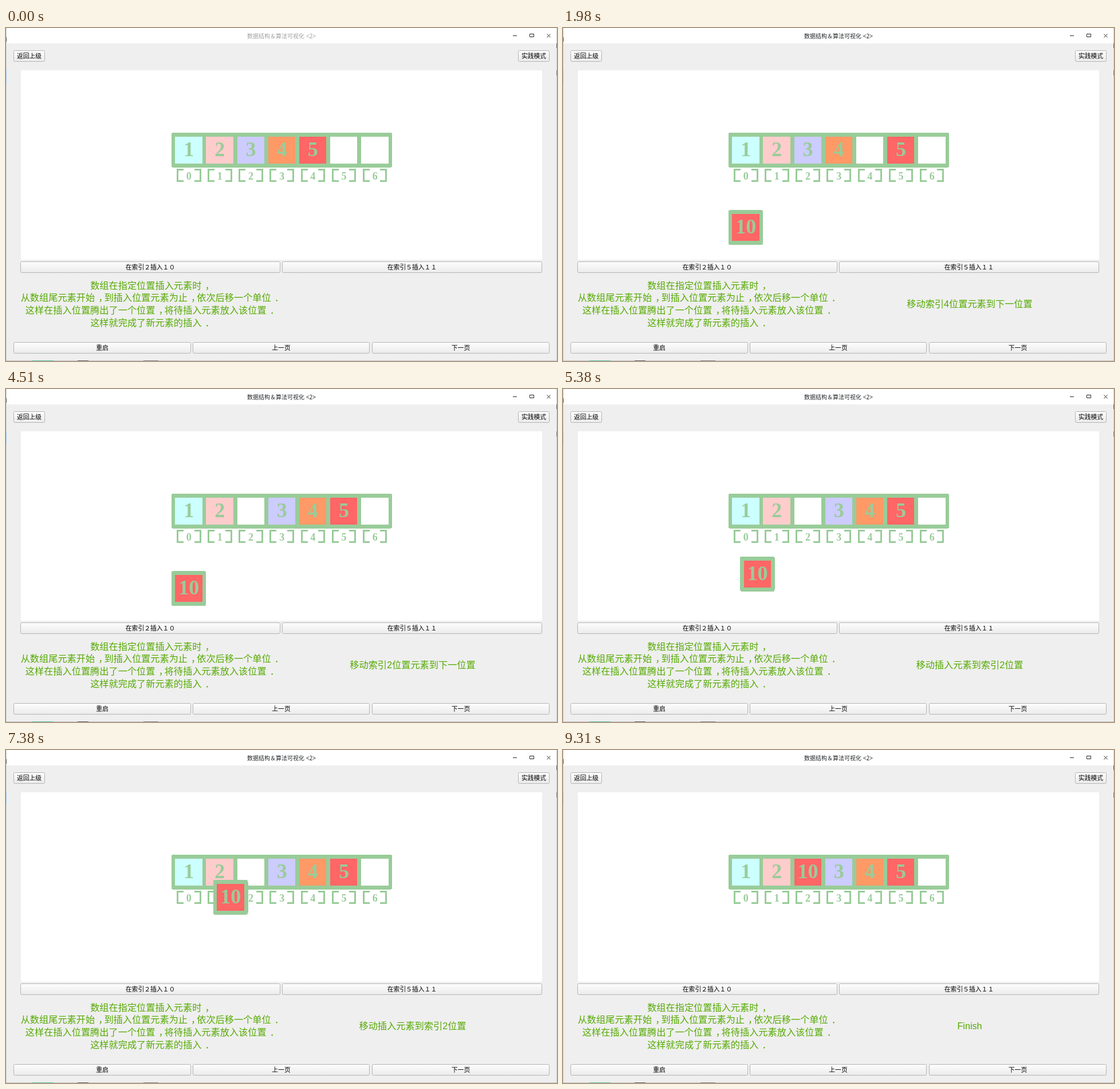
An HTML page that plays this animation: 962x582 px, repeating every 9960 ms.

```html
<!DOCTYPE html>
<html lang="zh-CN">
<head>
<meta charset="utf-8">
<title>Array insertion</title>
<style>
  html, body { margin: 0; width: 100%; height: 100%; overflow: hidden; background: #efefef; }
  svg { display: block; width: 962px; height: 582px; }
  text { white-space: pre; }
  .mid { text-anchor: middle; }
  .ui { font: 10.8px "Noto Sans CJK SC", "Noto Sans CJK", sans-serif; fill: #000; }
  .title { font: 10px "Noto Sans", "Noto Sans CJK SC", "Noto Sans CJK", sans-serif; }
  .note { font: 16.2px "Liberation Sans", "Noto Sans CJK SC", "Noto Sans CJK", sans-serif; fill: #55aa00; }
  .num { font: bold 36px "Liberation Serif", serif; fill: #99cc99; }
  .idx { font: bold 18px "Liberation Serif", serif; fill: #99cc99; }
  rect, .bracket { shape-rendering: crispEdges; }
  .bracket { fill: none; stroke: #99cc99; stroke-width: 3; }
  .btn { fill: url(#face); stroke: #b4b4b4; shape-rendering: auto; }
  .green { fill: #99cc99; }
</style>
</head>
<body>
<svg viewBox="0 0 962 582">
  <defs>
    <linearGradient id="face" x2="0" y2="1">
      <stop stop-color="#fdfdfd"/><stop offset="1" stop-color="#ebebeb"/>
    </linearGradient>
  </defs>
  <rect width="962" height="582" fill="#efefef"/>
  <rect width="962" height="27" fill="#fff"/>
  <rect x="26" y="74" width="910" height="331" fill="#fff"/>

  <!-- window edges -->
  <g>
    <rect width="1" height="582" fill="#d0d0d0"/>
    <rect x="961" width="1" height="582" fill="#d0d0d0"/>
    <rect y="581" width="962" height="1" fill="#c4c4c4"/>
    <rect y="16" width="1" height="8" fill="#555"/>
    <rect y="74" width="1" height="21" fill="#9cc8e8"/>
    <rect x="961" y="27" width="1" height="8" fill="#555"/>
    <rect x="961" y="74" width="1" height="9" fill="#777"/>
    <rect x="46" y="581" width="37" height="1" fill="#4dc09a"/>
    <rect x="125" y="581" width="19" height="1" fill="#555"/>
    <rect x="240" y="581" width="26" height="1" fill="#777"/>
  </g>

  <text id="title" class="title mid" x="481" y="18.2">数据结构＆算法可视化 &lt;2&gt;</text>
  <path fill="none" stroke="#232629"
    d="M885 13.5H892M914.5 10.5H921.5V15.5H914.5ZM944.5 10.5L950.5 16.5M950.5 10.5L944.5 16.5"/>

  <g id="buttons"></g>
  <g id="notes"></g>
  <text id="status" class="note mid" x="710" y="488"></text>
  <g id="array"></g>
  <g id="items"></g>
</svg>
<script>
const LOOP = 9960, FRAME = 50;
const SCALE = 0.677, PITCH = 80 * SCALE, LINE = 10 * SCALE;
const FILL = PITCH - LINE, BOX = PITCH + LINE;
const LEFT = 288.5, TOP = 182.9, DROP = 200 * SCALE;
const $ = id => document.getElementById(id);

const buttons = [
  [13, 39, 55, '返回上级'], [894, 39, 55, '实践模式'],
  [25, 408, 454, '在索引２插入１０'], [482, 408, 454, '在索引５插入１１'],
  [13, 549, 310, '重启'], [326, 549, 309, '上一页'], [639, 549, 310, '下一页']
];
$('buttons').innerHTML = buttons.map(([x, y, w, label]) =>
  `<rect class="btn" x="${x + .5}" y="${y + .5}" width="${w - 1}" height="19" rx="2"/>
    <text class="ui mid" x="${x + w / 2}" y="${y + 14}">${label}</text>`
).join('');

const notes = [
  '数组在指定位置插入元素时，',
  '从数组尾元素开始，到插入位置元素为止，依次后移一个单位．',
  '这样在插入位置腾出了一个位置，将待插入元素放入该位置．',
  '这样就完成了新元素的插入．'
];
// Punctuation sits in the middle of its full-width cell.
const spaced = s => s.replace(/([，．])([^，．]*)/g,
  '<tspan dx="6">$1</tspan><tspan dx="-6">$2</tspan>');
$('notes').innerHTML = notes.map((s, i) =>
  `<text class="note" x="${252.5 - s.length * 8.1}" y="${Math.round(455.6 + i * 21.7)}">${spaced(s)}</text>`
).join('');

const slotX = i => LEFT + i * PITCH;

let cells = `<rect class="green" x="${LEFT}" y="${TOP}" width="${6 * PITCH + BOX}" height="${BOX}" rx="4"/>`;
for (let i = 0; i < 7; i++) {
  const x = slotX(i);
  cells += `<rect x="${x + LINE}" y="${TOP + LINE}" width="${FILL}" height="${FILL}" fill="#fff"/>
    <path class="bracket"
      d="M${x + 21.5} 247.5H${x + 11}V267.5H${x + 21.5}M${x + 40} 247.5H${x + 50.5}V267.5H${x + 40}"/>
    <text class="idx mid" x="${x + 30.7}" y="264.6">${i}</text>`;
}
$('array').innerHTML = cells;

const values = [[1, '#ccffff'], [2, '#ffcccc'], [3, '#ccccff'], [4, '#ff9966'], [5, '#ff6666'], [10, '#ff6666']];
$('items').innerHTML = values.map(([n, fill]) =>
  `<g><rect class="green" width="${BOX}" height="${BOX}" rx="4"/>
    <rect x="${LINE}" y="${LINE}" width="${FILL}" height="${FILL}" fill="${fill}"/>
    <text class="num mid" x="30.7" y="41.1">${n}</text></g>`
).join('');
const items = [...$('items').children];

const place = (i, x, y) => items[i].setAttribute('transform', `translate(${x} ${y})`);

// Whole steps shown at time t, from [time, step] keys, refreshed once per FRAME.
function steps(t, keys) {
  if (t <= keys[0][0]) return keys[0][1];
  for (let i = 1; i < keys.length; i++) {
    const [t0, a] = keys[i - 1], [t1, b] = keys[i];
    if (t >= t1) continue;
    const shown = Math.floor((t - t0) / FRAME) * FRAME;
    return Math.floor(a + (b - a) * shown / (t1 - t0));
  }
  return keys[keys.length - 1][1];
}

const shift5 = [[680, 0], [1480, 18], [1570, 20], [1740, 20], [1960, 25]];
const shift4 = [[2270, 0], [3360, 25]];
const shift3 = [[3410, 0], [4500, 25]];
const insert = [[4510, 0], [4960, 10], [5180, 10], [5420, 16], [5680, 16], [8510, 80]];

const shiftText = i => `移动索引${i}位置元素到下一位置`;
const messages = [
  [0, ''], [680, shiftText(4)], [2270, shiftText(3)], [3410, shiftText(2)],
  [4560, '移动插入元素到索引2位置'], [8580, 'Finish']
];

function draw() {
  const t = performance.now() % LOOP;
  const slide = (i, n) => place(i, slotX(i + n / 25), TOP);

  slide(0, 0);
  slide(1, 0);
  slide(2, steps(t, shift3));
  slide(3, steps(t, shift4));
  slide(4, steps(t, shift5));

  const k = steps(t, insert) / 80;
  place(5, slotX(2 * k), TOP + DROP * (1 - k));
  items[5].style.display = t < 680 ? 'none' : '';

  $('title').style.fill = t < 520 ? '#a0a0a0' : '#232629';
  const text = messages.filter(m => m[0] <= t).pop()[1];
  if ($('status').textContent !== text) $('status').textContent = text;
  requestAnimationFrame(draw);
}
draw();
</script>
</body>
</html>
```
